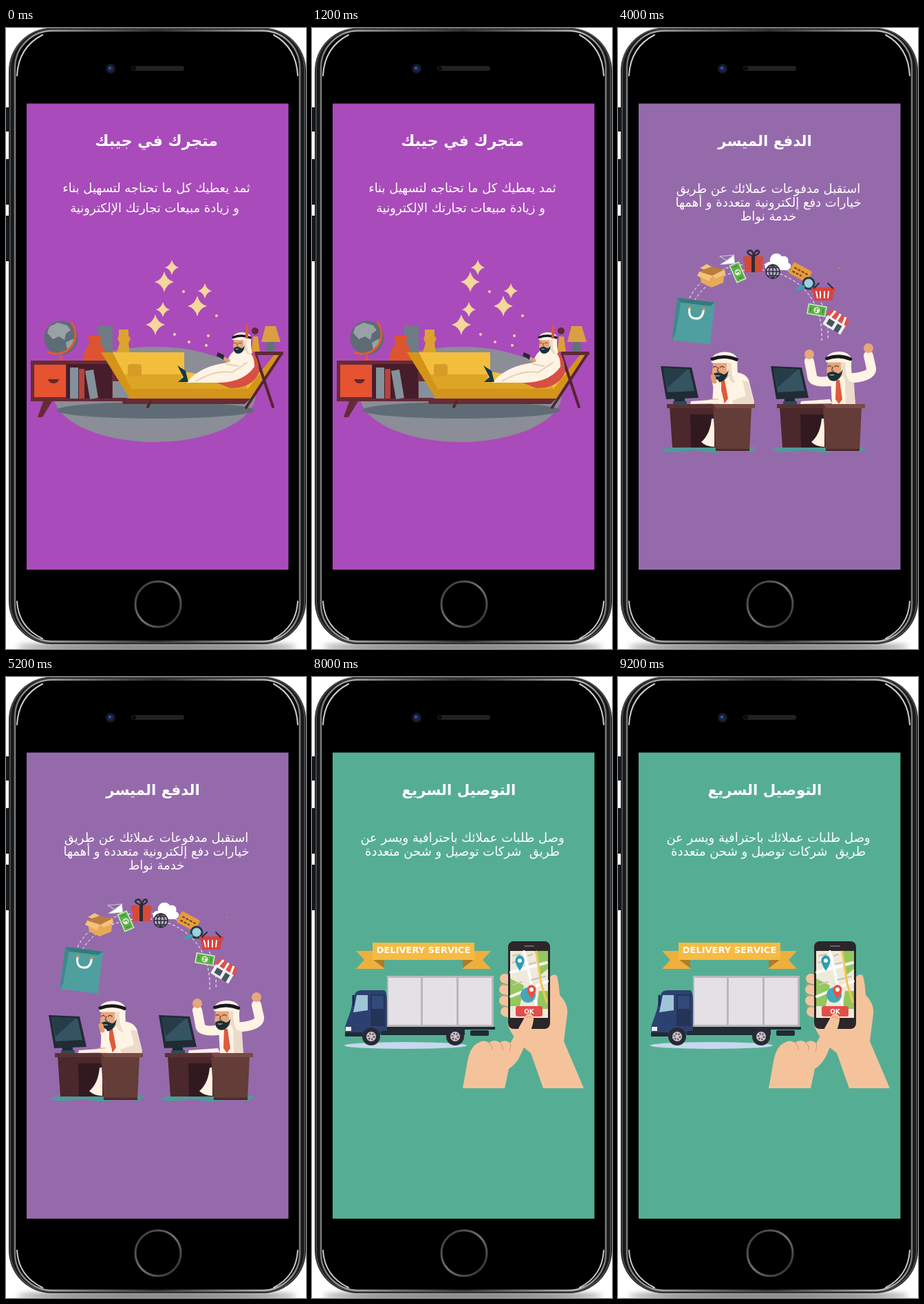
An HTML page for the animation above (10000 ms loop, 436 px wide and 900 px high).

```html
<!DOCTYPE html>
<html lang="ar">
<head>
<meta charset="utf-8">
<title>Store app slides</title>
<style>
html, body { margin: 0; width: 100%; height: 100%; overflow: hidden; background: #fff; }
svg { display: block; width: 436px; height: 900px; }
.slide { visibility: hidden; animation: show 10s step-end infinite; animation-delay: calc(var(--i) * 2s - 10s); }
@keyframes show { 0% { visibility: visible; } 20%, 100% { visibility: hidden; } }
.title, .copy { font-family: "DejaVu Sans", "Noto Sans", sans-serif; fill: #fff; text-anchor: middle; direction: rtl; }
.title { font-size: 21.3px; font-weight: 700; }
.copy { font-size: 18px; }
.line { fill: none; stroke-linecap: round; stroke-linejoin: round; }
.dash { fill: none; stroke: #fff; stroke-dasharray: 4 3; }
.skin { fill: #e6a77c; }
.hand { fill: #f4c39c; }
.robe { fill: #fff3e4; }
.shade { fill: #eadbca; }
.ink { fill: #202b33; }
.red { fill: #df5148; }
.teal { fill: #079b90; }
.label { font-family: "DejaVu Sans", sans-serif; font-weight: 700; fill: #fff; text-anchor: middle; }
</style>
</head>
<body>
<svg viewBox="0 0 436 900" xmlns="http://www.w3.org/2000/svg">
<defs>
  <linearGradient id="rim" x2="1" y2="0">
    <stop offset="0" stop-color="#77797b"/><stop offset=".12" stop-color="#a6a8aa"/>
    <stop offset=".5" stop-color="#303234"/><stop offset=".9" stop-color="#bbbdbe"/><stop offset="1" stop-color="#77797b"/>
  </linearGradient>
  <linearGradient id="ring" x2="1" y2="1">
    <stop offset="0" stop-color="#2d2e30"/><stop offset=".5" stop-color="#727376"/><stop offset="1" stop-color="#222325"/>
  </linearGradient>
  <filter id="soft" x="-10%" y="-100%" width="120%" height="300%"><feGaussianBlur stdDeviation="4"/></filter>

  <path id="spark" fill="#f5d69b" d="M0-15Q3-3 14 0Q3 3 0 15Q-3 3-14 0Q-3-3 0-15Z"/>
  <path id="star" fill="#fff" d="M0-6L2-2 6-2 3 1 4 6 0 3-4 6-3 1-6-2-2-2Z"/>

  <g id="head">
    <path class="skin" d="M-7-10H20L22 6Q23 24 7 25Q-7 21-10 6Z"/>
    <path class="robe" d="M-23-12C-23-32 20-33 24-13L23-8-4-8Q-2 5-7 14-10 29-26 24-21 8-23-12Z"/>
    <path class="shade" d="M-4-8Q-2 5-7 14-10 29-19 27-10 12-12-8Z"/>
    <path class="line" stroke="#17181c" stroke-width="6" d="M-21-14Q0-23 22-15"/>
    <path class="line" stroke="#5d3326" stroke-width="1.4" d="M1 0Q5-4 8 0M14 0Q17-4 20 0M11 0L13 6 10 8"/>
  </g>
  <path id="beard" fill="#17303a" d="M-7 5Q-1 15 4 11 13 6 21 12Q21 25 9 26-4 24-7 5ZM7 14Q13 18 18 14Z" fill-rule="evenodd"/>

  <g id="bag">
    <path fill="#4f9f9f" d="M0 0H73V81H0Z"/><path fill="#347a7c" d="M0 0H73L65 8H8Z"/>
    <path fill="#3f898b" d="M0 0L8 8 5 70 0 81Z"/>
    <path class="line" stroke="#fff" stroke-width="4" d="M26 17Q25 35 39 35T53 17"/>
    <path class="line" stroke="#dc8b3f" stroke-width="5" d="M26 15h1M53 15h1"/>
  </g>
  <g id="note">
    <path fill="#58b248" stroke="#d7edc0" stroke-width="1.5" d="M-13-7H13V7H-13Z"/>
    <circle r="4.5" fill="#e2f2ce"/><path class="line" stroke="#347b34" d="M2-2Q-3-3-1 0T-2 2M-9-3v6M9-3v6"/>
  </g>
  <g id="awning">
    <path class="red" d="M-13-8H13L17 2H-17Z"/>
    <path fill="#edf0ee" d="M-14 2H14V16H-14Z"/><path fill="#465564" d="M-10 5H-1V13H-10ZM3 5H10V16H3Z"/>
    <path stroke="#fff" stroke-width="3" d="M-8-8L-10 3M0-8V3M8-8L10 3"/>
  </g>
  <g id="desk">
    <path fill="#4f9a9a" d="M62 612L76 607H202L193 614 165 612 140 616 112 612 80 615Z"/>
    <path fill="#4b282c" d="M75 549H143V608H79Z"/><path fill="#301a20" d="M105 560H140V608H106Z"/>
    <path class="robe" d="M136 566Q134 589 121 600 128 607 140 607V566Z"/>
    <path fill="#643c38" d="M138 550H194L191 613H142Z"/><path fill="#4b282c" d="M142 610H191V613H142Z"/>
    <path fill="#794b43" d="M71 545H199V551H71Z"/><path fill="#5a3232" d="M71 545H138L142 551H71Z"/>
    <path fill="#1c2932" d="M81 520H94L98 544H82Z"/><path fill="#304852" d="M80 541H100V546H80Z"/>
    <path class="ink" d="M62 490L107 492 117 536 70 538Z"/><path fill="#345462" d="M66 493L104 495 111 526 72 528Z"/>
    <path fill="#263d49" d="M66 493L101 495 72 521Z"/>
    <path class="robe" d="M106 541L148 538 151 544 105 545Z"/>
  </g>
</defs>

<!-- handset -->
<ellipse cx="219" cy="897" rx="203" ry="6" fill="#777" filter="url(#soft)"/>
<path fill="#151618" d="M0 115h7v35H0ZM0 190h7v66H0ZM0 272h7v66H0Z"/>
<rect x="4" width="432" height="893" rx="62" fill="#17191a"/>
<rect x="6" y="1" width="428" height="890" rx="60" fill="none" stroke="#45484a" stroke-width="2"/>
<rect x="13" y="4" width="414" height="885" rx="54" stroke="url(#rim)" stroke-width="2.5"/>
<path class="line" stroke="#c9cbcc" stroke-width="2" d="M16 69Q18 28 53 10M424 69Q422 28 389 10M16 831Q18 868 53 885M424 831Q422 868 389 885"/>
<circle cx="152" cy="59" r="7" fill="#18191d"/><circle cx="152" cy="59" r="4.5" fill="#152550"/><circle cx="151" cy="58" r="2" fill="#3d579d"/>
<rect x="182" y="55" width="77" height="7" rx="3.5" fill="#202123"/><circle cx="186" cy="58.5" r="3" fill="#08090a"/>
<circle cx="221" cy="835" r="33" stroke="url(#ring)" stroke-width="3"/>

<g class="slide" style="--i:0">
  <rect x="30" y="109.500" width="380.500" height="675.500" fill="#a94bba"/>
  <text class="title" x="218.500" y="171" style="font-size:22px">متجرك في جيبك</text>
  <text class="copy" x="218.500" y="238">ثمد يعطيك كل ما تحتاجه لتسهيل بناء</text>
  <text class="copy" x="216" y="267">و زيادة مبيعات تجارتك الإلكترونية</text>
  <ellipse cx="216" cy="531" rx="147" ry="69" fill="#8b8d97"/>
  <ellipse cx="217" cy="554" rx="144" ry="12" fill="#5f6c76"/>
  <use href="#spark" transform="translate(241 347) scale(.74)"/><use href="#spark" x="230" y="368"/>
  <use href="#spark" transform="translate(289 381) scale(.74)"/><use href="#spark" x="278" y="403"/>
  <use href="#spark" transform="translate(228 408) scale(.74)"/><use href="#spark" x="217" y="430"/>
  <path class="line" stroke="#f5d69b" stroke-width="4" d="M258 382h0M306 417h0M245 444h0M266 455h0M294 446h0M291 460h0"/>
  <path fill="#6e7c85" d="M134 432H155V483H134Z"/>
  <path fill="#dca22f" d="M164 437H178V446L181 450 178 457 180 470H161L165 457 162 450 164 446Z"/>
  <path fill="#dd5431" d="M119 446H139L136 456Q145 463 145 483H112Q113 465 122 456Z"/>
  <circle cx="80" cy="449" r="24.500" fill="#5d6c76"/>
  <path fill="#98a2a5" d="M63 433L75 427 89 431 94 438 87 443 85 452 77 447 68 451 60 442ZM87 456L98 450 97 461 89 466Z"/>
  <path class="line" stroke="#e35933" stroke-width="3" d="M95 427A28 28 0 0 1 62 470M80 475V482M67 483H92"/>
  <path fill="#672b36" d="M36 482H176V541H36Z"/><path fill="#461d2a" d="M88 487H154V537H88Z"/>
  <path fill="#e55330" d="M41 488H87V535H41Z"/><path fill="#63272d" d="M61 509H77Q75 515 69 515T61 509Z"/>
  <path fill="#83919a" d="M93 492H105V537H93ZM115 497L127 495 134 536 122 538ZM155 512H177V536H155Z"/><path fill="#b9433b" d="M106 494H114V537H106Z"/>
  <path fill="#672b36" d="M54 541H67L53 564H46ZM168 537H355L347 545H170Z"/>
  <path fill="#d49419" d="M138 470H156L183 522H351L391 472H398L355 537H180Z"/>
  <path fill="#f4be3d" d="M155 470H259V498L340 511 371 498 351 523H183Z"/>
  <path fill="#dca525" d="M171 502H255V510H346L351 523H183Z"/>
  <rect x="177" y="487" width="20" height="18" rx="4" fill="#d79c27"/>
  <path class="line" stroke="#562530" stroke-width="4" d="M363 474L388 549M399 474L349 550M210 541L206 549"/>
  <path fill="#d75042" d="M306 514Q304 501 322 490 333 462 353 462 370 479 367 501 357 522 326 522Z"/>
  <path class="robe" d="M262 514Q282 490 321 485 327 464 345 463 362 471 361 491 346 513 310 514Z"/>
  <path class="line" stroke="#e3cfbb" stroke-width="2" d="M276 512Q304 495 329 499L350 485M321 487L337 490"/>
  <path fill="#16384a" d="M249 489L261 497 265 513 250 513 258 506Z"/>
  <g transform="translate(343 457) scale(-.58 .58)"><use href="#head"/><use href="#beard"/></g>
  <path class="line" stroke="#e0a073" stroke-width="5" d="M312 477L323 482"/>
  <path class="ink" d="M308 470L317 474 316 481 306 475Z"/>
  <path fill="#5e2931" d="M362 469H403V474H362Z"/>
  <path fill="#d99f41" d="M377 432H392L399 455H371Z"/><path fill="#63717a" d="M382 455H388Q395 462 388 469H380Q373 462 382 455Z"/>
  <path fill="#dda034" d="M359 447H366L369 469H357Z"/><path fill="#df5635" d="M348 430H352V450H348Z"/><circle cx="362" cy="439" r="5" fill="#5e2931"/>
</g>

<g class="slide" style="--i:1">
  <rect x="30" y="109.500" width="380.500" height="675.500" fill="#f4b942"/>
  <path stroke="#f8cd77" d="M30 336.500H325M30 631.500H333"/>
  <text class="title" x="213.500" y="171">إدارة المخزون و تصميم المتجر</text>
  <text class="copy" x="218" y="239">أضف منتجاتك و أنشئ متجرك الإلكتروني</text>
  <text class="copy" x="218.500" y="259">في دقائق و بخطوات بسيطة</text>
  <path class="dash" d="M52 542.500H313M75 455L106 452 109 407M128 361L143 367 153 382M266 488L300 462V450" stroke-width="1.500"/>
  <use href="#star" x="67" y="381"/><use href="#star" transform="translate(242 389) scale(.8)"/>
  <use href="#star" transform="translate(89 435) scale(.5)"/><use href="#star" transform="translate(292 475) scale(.5)"/><use href="#star" transform="translate(276 607) scale(.5)"/>
  <circle cx="48" cy="399" r="2.500" fill="#fff"/>
  <path fill="#fffaf0" d="M94 417C78 416 83 399 94 400 94 386 110 382 117 392 127 377 145 387 144 395 163 395 160 417 146 418Z"/>
  <g transform="translate(121 381) rotate(53)"><rect x="-19" y="-12" width="38" height="24" rx="2" class="teal"/><path fill="#214451" d="M-19-7H19V-1H-19Z"/><path stroke="#fff" d="M-14 6H5"/></g>
  <g transform="translate(112 401) rotate(18)"><path fill="#dc4c47" d="M-17-9H17V9H-17Z"/><path fill="none" stroke="#fff" d="M-14-6H14V6H-14Z"/><circle r="4" fill="#fff"/></g>
  <circle cx="123" cy="395" r="7" fill="#e5a22d"/><text class="label" x="123" y="398.500" style="font-size:9px">$</text>
  <path fill="#505d69" d="M76 461H117V518H76Z"/><path fill="#3e4955" d="M76 461H117L76 493Z"/>
  <path class="teal" d="M55 485H77V514H114V528H50V505Z"/><path fill="#fff" d="M57 489H72V506H53Z"/>
  <g fill="#fff" stroke="#263640" stroke-width="5"><circle cx="74" cy="521" r="8"/><circle cx="103" cy="521" r="8"/></g>
  <path class="teal" d="M116 445H272V532H116Z"/><path fill="#fff" d="M121 445H267V514H121ZM116 520H272V528Q272 532 266 532H121Q116 532 116 528Z"/>
  <path fill="#dfe5e3" d="M121 450H267V514H238L175 450Z"/>
  <path class="teal" d="M177 532H211L217 548H170Z"/>
  <g fill="#fffaf0" stroke="#243b47" stroke-width="2"><path d="M132 464H169V506H132ZM219 464H256V506H219Z"/></g>
  <path class="red" d="M150 471H155L156 481 161 498H144L149 482ZM231 474L237 477 243 474 249 482 245 485V501H234V485L228 482ZM224 490H235V501H224Z"/>
  <path fill="#cf8e35" d="M158 469L161 472 157 476 154 472Z"/><path fill="#4d6673" d="M137 490H147V501H137ZM228 493H233V498H228Z"/>
  <path class="ink" d="M178 474H208V514H178Z"/><path fill="#fff" d="M182 479H204V508H182Z"/><path fill="#334c59" d="M183 480H203V507H183Z"/>
  <path class="line" stroke="#fff" d="M184 491L193 484 202 491"/><path class="red" d="M184 490H203V500H184Z"/><text class="label" x="193.500" y="498" style="font-size:6px">OPEN</text>
  <g id="stripes"></g>
  <path fill="#b64838" d="M119 404H270L272 410H117Z"/>
  <ellipse cx="284" cy="502" rx="10" ry="14" class="teal"/><ellipse cx="270" cy="517" rx="6" ry="12" fill="#315362"/><ellipse cx="295" cy="517" rx="6" ry="12" fill="#315362"/>
  <path stroke="#263640" stroke-width="2" d="M284 504V532M270 518V532M295 518V532"/>
  <text x="109" y="555" text-anchor="middle" style="font:500 8px 'DejaVu Sans',sans-serif;letter-spacing:.4px" fill="#263640">ONLINE SHOP</text>
  <path class="line" stroke="#fff" stroke-width="2.500" d="M180 541H156Q151 541 151 546T159 558H271Q276 558 276 564T271 570H203Q198 570 198 576T203 582H253Q258 582 258 592"/>
  <rect x="250" y="591" width="17" height="25" rx="8.500" fill="#fff"/><path class="line" stroke="#dc554c" stroke-width="2" d="M258.500 596V602"/>
  <path class="dash" stroke-width="1" d="M247 600Q247 622 263 619"/>
  <ellipse cx="352" cy="576" rx="46" ry="4.500" fill="#747570"/>
  <path fill="#a82429" d="M347 438L367 440Q378 457 376 493L381 574Q350 580 322 573 340 532 343 480Z"/>
  <path class="line" stroke="#7f1d25" stroke-width="1.300" d="M355 449Q343 520 334 573M364 450Q361 520 360 575M369 467Q369 523 373 571"/>
  <path class="line" stroke="#15161c" stroke-width="11" d="M346 390L320 405"/>
  <path fill="#15161c" d="M344 383L365 378 379 392 377 408 363 424 369 439 357 445 346 439 350 426 343 407Z"/>
  <path class="line" stroke="#15161c" stroke-width="11" d="M370 389L392 380"/>
  <path class="line" stroke="#a82429" stroke-width="9" d="M320 405L310 389M394 382L376 367"/>
  <path class="line" stroke="#e4a27b" stroke-width="2.500" d="M309 389L296 386M308 388L294 390M306 389L298 397"/>
  <path fill="#8bbbc1" d="M339 371Q330 352 345 343 363 341 365 356L369 383Q371 394 363 403L358 390 341 388Z"/>
  <path class="skin" d="M347 355Q352 346 364 351L368 369Q363 383 351 373Z"/>
  <path fill="#fff" stroke="#b53331" d="M352 366Q360 371 366 364 364 379 352 370Z"/>
  <path class="line" stroke="#3a2225" stroke-width="1.300" d="M349 359Q353 355 355 359M360 357Q363 354 366 357"/>
  <path class="line" stroke="#272831" stroke-width="4" d="M371 362L374 373"/>
</g>

<g class="slide" style="--i:2">
  <rect x="30" y="109.500" width="380.500" height="675.500" fill="#956aab"/>
  <text class="title" x="213.500" y="171">الدفع الميسر</text>
  <text class="copy" x="218.500" y="239">استقبل مدفوعات عملائك عن طريق</text>
  <text class="copy" x="218.500" y="259">خيارات دفع إلكترونية متعددة و أهمها</text>
  <text class="copy" x="218.500" y="279">خدمة نواط</text>
  <path class="dash" d="M101 398C117 358 158 341 204 342 267 344 309 390 305 452M108 401C124 367 162 350 203 350 258 353 299 391 296 453"/>
  <use href="#bag" transform="translate(86 391) rotate(7) scale(.76)"/>
  <path fill="#e6aa59" d="M118 353L137 359 155 350 153 369 136 376 121 369Z"/><path fill="#bd7c3c" d="M118 353L136 346 155 350 137 359Z"/>
  <path fill="#f2c27a" d="M118 353L137 359 132 367 115 359ZM136 346L129 342 119 348 125 350ZM155 350L137 359 142 363 156 357Z"/>
  <g transform="rotate(-5 158 336)"><path fill="#fff" stroke="#ccd2d6" d="M148 330H169V342H148L158 337 169 330M148 330L158 337"/></g>
  <use href="#note" transform="translate(174 354) rotate(66)"/>
  <path fill="#d54a38" d="M184 337H210V354H184ZM182 331H211V339H182Z"/><path fill="#302b35" d="M194 331H199V354H194Z"/>
  <path class="line" stroke="#302b35" stroke-width="2.500" d="M197 331Q184 326 190 323T197 331Q208 326 204 323T197 331"/>
  <path fill="#fff" d="M219 351C210 349 213 338 221 339 219 327 233 323 238 331 249 329 248 339 247 340 256 344 249 351 245 351Z"/>
  <circle cx="225" cy="353" r="10" fill="#b9a9c9"/><path class="line" stroke="#292c36" stroke-width="1.500" d="M215 353a10 10 0 1 0 20 0a10 10 0 1 0-20 0H235M225 343V363M225 343Q214 353 225 363M225 343Q236 353 225 363M218 347H232M218 359H232"/>
  <g transform="translate(265 354) rotate(28)"><rect x="-15" y="-9" width="30" height="18" rx="2" fill="#e99c37"/><path stroke="#5e4237" stroke-width="2" stroke-dasharray="4 2" d="M-11-2H11M-11 4H4"/></g>
  <circle cx="277" cy="370" r="8" fill="#9ed0db" stroke="#253b48" stroke-width="3"/><path class="line" stroke="#36a7b2" stroke-width="5" d="M269 375L262 378"/>
  <path fill="#d9423d" d="M281 376H316V381H314L311 395H286L283 381H281Z"/><path class="line" stroke="#fff" stroke-width="2" d="M288 382L290 391M294 382V391M300 382V391M306 382L305 391"/><path class="line" stroke="#292c36" stroke-width="2" d="M285 377L292 370M312 377L305 370"/>
  <use href="#note" transform="translate(289 409) rotate(10)"/>
  <use href="#awning" transform="translate(319 422) rotate(31) scale(1.08)"/>
  <path fill="#d7823a" d="M320 347h2v2h-2Z"/>
  <g>
    <path class="robe" d="M139 510L165 499Q184 498 190 510L198 542Q180 548 137 545Z"/>
    <path class="shade" d="M181 511L186 533 166 540 168 545H198L190 513Z"/>
    <path fill="#e0593c" d="M150 510L155 510 160 537 155 544 150 537Z"/>
    <g transform="translate(155 492) scale(-.82 .82)"><use href="#head"/><use href="#beard"/></g>
    <path class="line" stroke="#fff3e4" stroke-width="10" d="M149 541L142 514"/><path class="line" stroke="#e0a073" stroke-width="7" d="M140 512L138 505M135 541H145"/>
    <use href="#desk"/>
  </g>
  <path class="line" stroke="#fff3e4" stroke-width="14" d="M314 511Q282 516 282 504L278 483M332 508Q370 506 368 493L364 475"/>
  <path class="robe" d="M309 508L328 502 341 508 345 546H311Z"/><path class="shade" d="M330 510L343 514 345 546H331Z"/>
  <path fill="#e0593c" d="M317 510H322L326 538 321 545 316 538Z"/>
  <g transform="translate(321 491) scale(-.8 .8)"><use href="#head"/><use href="#beard"/></g>
  <g class="skin"><circle cx="278" cy="473" r="7"/><circle cx="364" cy="464" r="7"/></g>
  <use href="#desk" x="160"/>
</g>

<g class="slide" style="--i:3">
  <rect x="30" y="109.500" width="380.500" height="675.500" fill="#f4b942"/>
  <text class="title" x="216" y="171">إدارة الطلبات والتواصل مع العملاء</text>
  <text class="copy" x="221" y="239">تابع طلبات عملائك و تواصل معهم بشكل</text>
  <text class="copy" x="220.500" y="259">فعال و سلس</text>
  <ellipse cx="221" cy="608" rx="169" ry="12" fill="#c69636"/>
  <path fill="#dc4b40" d="M226 369C218 359 201 353 201 337 201 321 221 318 226 332Z"/><path fill="#b73e38" d="M226 369C234 359 251 353 251 337 251 321 231 318 226 332Z"/>
  <path fill="#16384a" d="M83 606Q87 597 103 594L117 605ZM148 594L166 599Q184 598 188 605H149ZM331 594L346 595Q361 596 364 604H333Z"/>
  <path class="line" stroke="#fff3e4" stroke-width="13" d="M150 439L174 449 190 440M303 436L267 449 258 440"/>
  <path class="robe" d="M115 417Q134 414 153 420 164 430 163 455 158 500 163 602Q131 608 99 602 115 549 118 468Q106 460 101 445 97 424 115 417Z"/>
  <path class="shade" d="M101 444Q110 465 119 462 129 464 130 480L117 604 99 602Q115 549 118 468 106 461 101 444Z"/>
  <path class="line" stroke="#eadbca" stroke-width="2" d="M113 430Q122 445 120 460L147 435"/>
  <path fill="#dd5241" d="M136 420L144 419 146 430 155 459 148 465 141 434Z"/>
  <g transform="translate(139 395)"><use href="#head"/><use href="#beard"/></g>
  <path class="line" stroke="#fff3e4" stroke-width="12" d="M119 459L146 434"/>
  <path class="line" stroke="#e0a073" stroke-width="8" d="M150 430L157 423M190 439L198 433"/>
  <path fill="#fff" d="M158 414H171Q172 427 167 430H160Z"/><path fill="none" stroke="#fff" stroke-width="2" d="M171 417Q178 422 169 426"/>
  <path class="line" stroke="#fff0d5" stroke-width="1.500" d="M165 408Q160 401 166 395T165 382"/>
  <path fill="#17343d" d="M190 423L202 421 197 440 184 443Z"/><path fill="#35706f" d="M192 425L199 424 195 438 187 440Z"/>
  <path class="robe" d="M291 419Q314 410 334 417 349 424 345 441 339 457 330 462 331 525 350 600 323 608 291 602 287 507 286 462 280 433 291 419Z"/>
  <path class="shade" d="M346 430Q341 455 330 462 331 525 350 600L329 604Q316 530 317 462 331 455 346 430Z"/>
  <path class="line" stroke="#eadbca" stroke-width="2" d="M336 429Q329 450 315 460L293 449"/>
  <path fill="#dd5241" d="M303 419L309 419 309 446 304 451 300 445Z"/>
  <g transform="translate(307 394) scale(-1 1)"><use href="#head"/><path fill="#fff" d="M5 12Q13 15 19 10 17 20 5 15Z"/></g>
  <path class="line" stroke="#fff3e4" stroke-width="12" d="M318 458L284 439"/>
  <path class="line" stroke="#e0a073" stroke-width="8" d="M281 437L270 427M258 440L252 434"/>
  <path fill="#17343d" d="M245 421L258 420 265 441 253 444Z"/><path fill="#35706f" d="M248 424L255 423 261 439 254 441Z"/>
  <use href="#bag" x="226" y="525"/>
</g>

<g class="slide" style="--i:4">
  <rect x="30" y="109.500" width="380.500" height="675.500" fill="#55ae94"/>
  <text class="title" x="213.500" y="171">التوصيل السريع</text>
  <text class="copy" x="218.500" y="239">وصل طلبات عملائك باحترافية ويسر عن</text>
  <text class="copy" x="218.500" y="259">طريق&#160; شركات توصيل و شحن متعددة</text>
  <path fill="#eeb03c" d="M64 397H105V423H64L76 410ZM219 397H260L248 410 260 423H219Z"/>
  <path fill="#ad7c28" d="M88 409H105V422ZM219 409H236L219 422Z"/><path fill="#f6bb43" d="M88 385H236V410H88Z"/>
  <text class="label" x="162" y="400" style="font-size:13px">DELIVERY SERVICE</text>
  <ellipse cx="136" cy="534" rx="89" ry="5" fill="#c6d8ed"/>
  <path fill="#b8b8bb" d="M109 433H264V508H109Z"/><path fill="#e5e0e5" d="M111 436H158V504H111ZM161 436H210V504H161ZM213 436H261V504H213Z"/>
  <path class="ink" d="M96 507H266V511H222V519H100Z"/><rect x="230" y="512" width="27" height="8" rx="2" class="ink"/>
  <path fill="#2d4171" d="M48 507L56 484 62 460Q64 454 72 454H105Q109 456 109 470V513H101L98 520H49Z"/>
  <path fill="#9fc4d7" d="M65 461H81V483L60 486Z"/><path fill="#243457" d="M85 460H106V506H85Z"/><path fill="#324a7b" d="M87 462H104V481H87Z"/>
  <path fill="#e8ecee" d="M49 507H57V513H49Z"/><path class="ink" d="M48 515H73V521H48Z"/><path class="line" stroke="#1d2948" stroke-width="3" d="M60 462V475"/>
  <g fill="#d2c5cc" stroke="#272a34" stroke-width="6"><circle cx="86" cy="521" r="10"/><circle cx="208" cy="521" r="10"/></g>
  <g fill="none" stroke="#5a5660" stroke-width="3" stroke-dasharray="2 2"><circle cx="86" cy="521" r="4"/><circle cx="208" cy="521" r="4"/></g>
  <path class="hand" d="M342 443Q346 429 355 432 358 435 360 461 373 474 371 489L366 528 395 596H336L318 545Q291 525 284 502L345 500Z"/>
  <path class="line" stroke="#f4c39c" stroke-width="14" d="M280 437L291 440M279 453L291 456M279 469L291 472M281 485L291 488"/>
  <path class="line" stroke="#dda27d" d="M273 445L286 447M272 461L286 463M274 477L286 479"/>
  <rect x="285" y="383" width="61" height="127" rx="8" fill="#2b2629"/>
  <path fill="#eee9da" d="M288 397H343V494H288Z"/><path fill="#93c85e" d="M324 397H343V423L332 432ZM288 437L308 447 302 477H288ZM330 455H343V481H326Z"/>
  <path class="line" stroke="#fff" stroke-width="4" d="M289 428L341 414M308 398L326 475M289 463L342 441"/>
  <path class="line" stroke="#c9c2b5" stroke-width="2" d="M292 404L302 402M314 404L320 402M291 414L304 411M316 416L325 414M319 439L339 434M292 446L305 442"/>
  <path class="line" stroke="#f2c651" stroke-width="3" d="M326 398L333 444 341 471"/>
  <circle cx="314" cy="461" r="11" fill="#45a7bd"/>
  <path fill="#2b9fb5" d="M302 426Q289 407 302 403 315 407 302 426Z"/><path fill="#e65344" d="M319 467Q306 449 319 446 332 449 319 467Z"/>
  <g fill="#fff"><circle cx="302" cy="411" r="3"/><circle cx="319" cy="453" r="3"/></g>
  <rect x="296" y="477" width="39" height="15" rx="3" fill="#e34e49"/><text class="label" x="315.500" y="488" style="font-size:9px">OK</text>
  <path class="line" stroke="#6a6265" stroke-width="2" d="M309 390H322"/>
  <path class="hand" d="M219 596L226 557Q230 535 242 530 249 525 257 530 266 524 273 530 281 524 288 531L308 495Q314 483 321 491 324 496 318 512L304 546Q298 560 286 568L280 596Z"/>
  <path class="line" stroke="#dda27d" stroke-width="1.300" d="M257 530Q262 534 262 540M273 530Q278 534 277 541M288 531Q290 535 287 542M311 494Q316 490 319 495"/>
</g>
</svg>
<script>
const stripes = document.getElementById("stripes");
const colors = ["#e0554a", "#465564"];
let art = "";
for (let i = 0; i < 8; i++) {
  const top = 119 + i * 19, low = 108 + i * 21.5;
  art += `<path fill="${colors[i % 2]}" d="M${top} 407h19L${low + 21.5} 444a10.75 10.75 0 0 1-21.5 0Z"/>`;
}
stripes.innerHTML = art;
</script>
</body>
</html>
```
